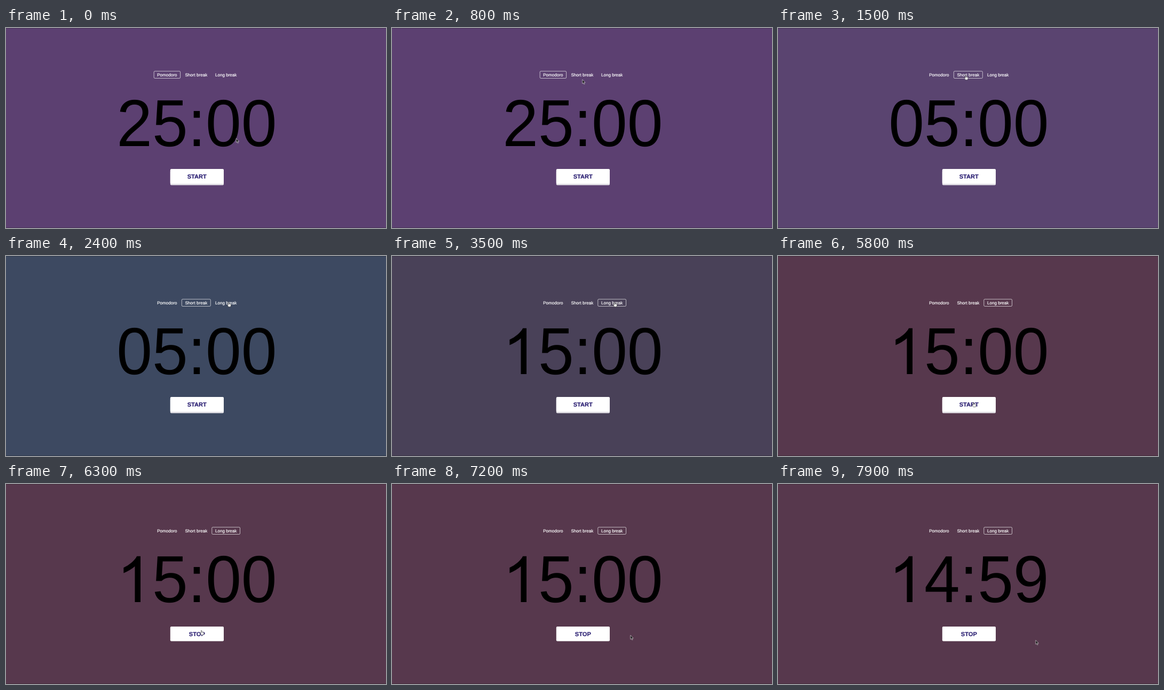
These frames come from a looping animation (712x376 px, 8000 ms). An HTML page:

```html
<!DOCTYPE html>
<html lang="en">
<head>
<meta charset="utf-8">
<title>Focus timer</title>
<style>
  html, body { margin: 0; width: 100%; height: 100%; overflow: hidden; }
  svg {
    display: block; width: 712px; height: 376px;
    font-family: "Liberation Sans", Arial, sans-serif;
    text-rendering: geometricPrecision;
    animation: backdrop 8s infinite;
  }
  svg * { animation: 8s step-end infinite; }

  .edge { fill: #000; opacity: .22; }
  .tabs { font-size: 8.1px; fill: #fff; stroke: #fff; stroke-width: .18; }
  .frame { y: 81.2px; height: 13.3px; fill: none; stroke-width: .65; animation-name: frame; }
  .clock { font-size: 120px; }
  .ghost { fill: none; }
  .d1 { animation-name: focus; }
  .d2 { animation-name: short; }
  .d3 { animation-name: long; }
  .d4 { animation-name: tick; }
  .button { font-size: 11.1px; font-weight: bold; text-anchor: middle; fill: #2d2274; }
  .button text { stroke: #2d2274; stroke-width: .2; }
  .start { animation-name: start; }
  .stop { animation-name: stop; }
  .button .face { fill: #fff; }
  .button .lip { fill: #e4e2e7; }
  .cursor { animation-name: travel; }
  .arrow { fill: #111; stroke: #fff; stroke-width: .6; animation-name: arrow; }
  .hand { fill: #fff; stroke: #222; stroke-width: .6; animation-name: hand; }

  @keyframes backdrop {
    0% { background: #5c4071; animation-timing-function: step-end; }
    18.75% { background: #5a4470; animation-timing-function: step-end; }
    21.25% { background: #4e446a; animation-timing-function: steps(2); }
    23.75% { background: #444765; animation-timing-function: steps(5); }
    30% { background: #3d4961; animation-timing-function: step-end; }
    41.25% { background: #3f4860; animation-timing-function: steps(2); }
    43.75% { background: #494158; animation-timing-function: steps(2); }
    46.25% { background: #513c52; animation-timing-function: steps(5); }
    52.5%, 100% { background: #57384d; }
  }
  @keyframes frame {
    0% { x: 277.2px; width: 49.4px; }
    18.75% { x: 329.3px; width: 54px; }
    41.25%, 100% { x: 385.8px; width: 52.7px; }
  }
  @keyframes focus { 0% { opacity: 1; } 18.75%, 100% { opacity: 0; } }
  @keyframes short { 0% { opacity: 0; } 18.75% { opacity: 1; } 41.25%, 100% { opacity: 0; } }
  @keyframes long { 0% { opacity: 0; } 41.25% { opacity: 1; } 91.25%, 100% { opacity: 0; } }
  @keyframes tick { 0% { opacity: 0; } 91.25%, 100% { opacity: 1; } }
  @keyframes start { 0% { opacity: 1; } 78.75%, 100% { opacity: 0; } }
  @keyframes stop { 0% { opacity: 0; } 78.75%, 100% { opacity: 1; } }

  /* one step every 100 ms while the pointer moves */
  @keyframes travel {
    0% { transform: translate(431.3px, 207.5px); animation-timing-function: steps(4); }
    5% { transform: translate(405px, 168px); animation-timing-function: steps(3); }
    8.75% { transform: translate(362px, 105px); animation-timing-function: steps(2); }
    11.25%, 20% { transform: translate(351.5px, 88.7px); animation-timing-function: steps(4); }
    25% { transform: translate(388px, 88px); animation-timing-function: steps(4); }
    30%, 55% { transform: translate(417px, 86.7px); animation-timing-function: steps(5); }
    61.25% { transform: translate(382.8px, 96.5px); animation-timing-function: steps(2); }
    63.75% { transform: translate(371px, 103px); animation-timing-function: steps(2); }
    66.25% { transform: translate(363px, 93px); animation-timing-function: steps(3); }
    70% { transform: translate(365px, 232px); animation-timing-function: steps(2); }
    72.5%, 83.75% { transform: translate(366.2px, 275px); animation-timing-function: steps(3); }
    87.5% { transform: translate(390px, 281px); animation-timing-function: steps(2); }
    90% { transform: translate(446.8px, 284.3px); animation-timing-function: step-end; }
    91.25%, 95% { transform: translate(471px, 279.5px); animation-timing-function: step-end; }
    96.25% { transform: translate(482px, 286px); animation-timing-function: steps(2); }
    98.75%, 100% { transform: translate(482.8px, 293.6px); }
  }
  @keyframes arrow {
    0% { opacity: 1; } 12.5% { opacity: 0; }
    60% { opacity: 1; } 66.25% { opacity: 0; }
    67.5% { opacity: 1; } 71.25% { opacity: 0; }
    88.75%, 100% { opacity: 1; }
  }
  @keyframes hand {
    0% { opacity: 0; } 12.5% { opacity: 1; }
    60% { opacity: 0; } 66.25% { opacity: 1; }
    67.5% { opacity: 0; } 71.25% { opacity: 1; }
    88.75%, 100% { opacity: 0; }
  }
</style>
</head>
<body>
<svg viewBox="0 0 712 376">
  <defs>
    <!-- numeral one without a foot, in em/2048 units -->
    <path id="one" transform="scale(.0586 -.0563)" d="M763 0H583V1147Q518 1085 412 1023T223 930V1104Q374 1175 487 1276T647 1472H763Z"/>
  </defs>

  <rect class="edge" width="712" height="1"/>
  <rect class="edge" y="375" width="712" height="1"/>

  <g class="tabs">
    <rect class="frame" rx="1.7"/>
    <text x="283.2" y="90.6">Pomodoro</text>
    <text x="335.4" y="90.6">Short break</text>
    <text x="391.9" y="90.6">Long break</text>
  </g>

  <g class="clock" transform="translate(207.3 222) scale(1 1.04)">
    <text class="d1">25:00</text>
    <text class="d2">05:00</text>
    <g class="d3"><use href="#one"/><text><tspan class="ghost">1</tspan>5:00</text></g>
    <g class="d4"><use href="#one"/><text><tspan class="ghost">1</tspan>4:59</text></g>
  </g>

  <g class="button">
    <g class="start">
      <rect class="lip" x="307.8" y="268" width="100.2" height="27.6" rx="2"/>
      <rect class="face" x="307.8" y="265" width="100.2" height="27.8" rx="2"/>
      <text x="357.8" y="282.8">START</text>
    </g>
    <g class="stop">
      <rect class="face" x="307.8" y="268" width="100.2" height="27.6" rx="2"/>
      <text x="357.8" y="285.8">STOP</text>
    </g>
  </g>

  <g class="cursor">
    <path class="arrow" d="M0 0V7.6L1.7 6.1L2.9 8.9L4.2 8.3L3 5.6H5.3Z"/>
    <path class="hand" d="M-.7 .5Q0 -.5 .7 .5V3.2L3.8 3.8Q4.8 4 4.6 5.2L3.8 8.8H-.2L-2.3 5.6Q-2.4 4.5 -1.4 4.9L-.7 5.5Z"/>
  </g>
</svg>
</body>
</html>
```
